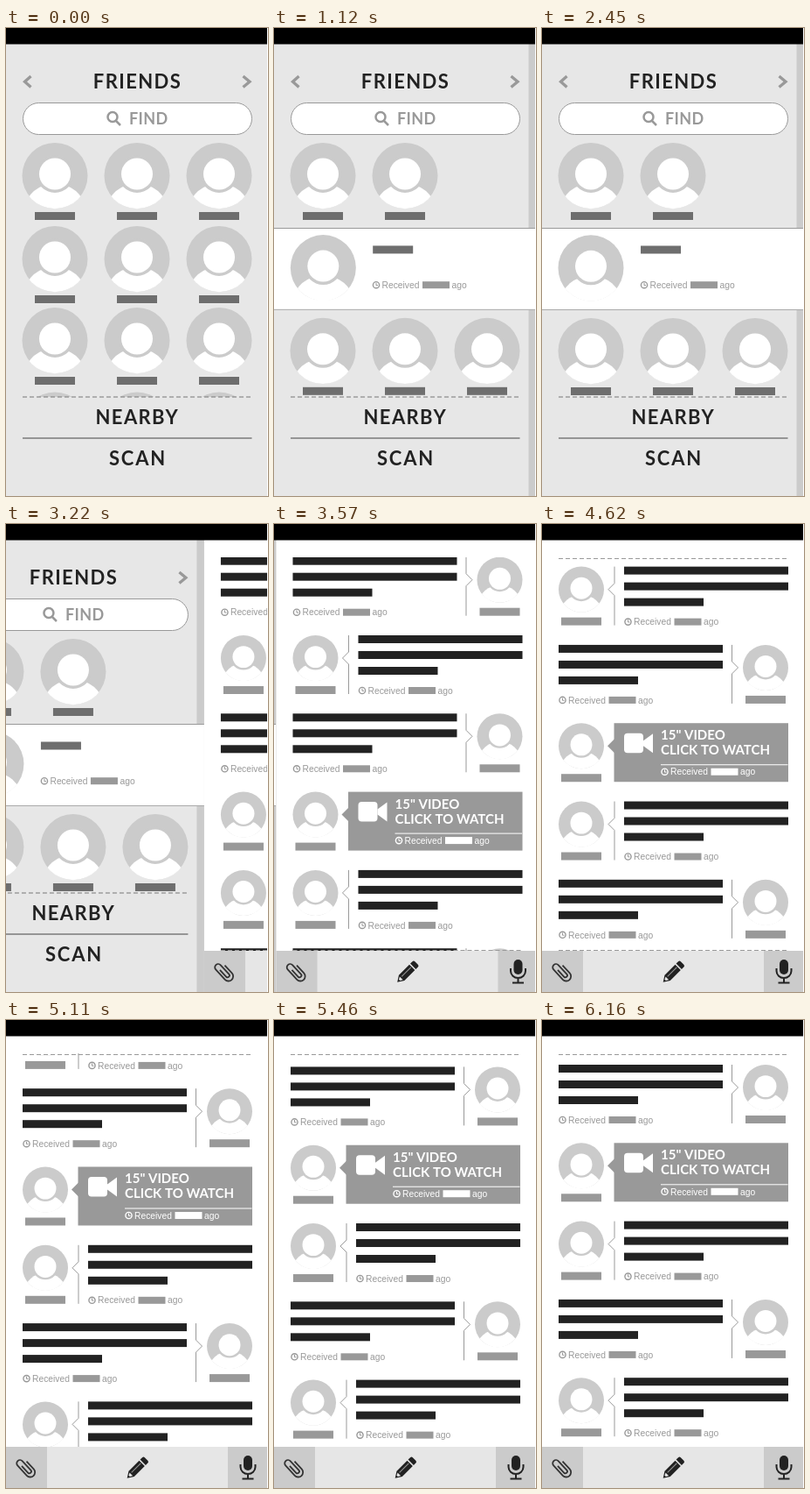
Write an HTML page with a canvas that moves like this. It is 300 px wide and 534 px high and loops after 6660 ms.

```html
<!DOCTYPE html>
<html lang="en">
<head>
<meta charset="utf-8">
<title>Friends and chat wireframe</title>
<style>
  html, body { margin: 0; width: 100%; height: 100%; overflow: hidden; background: #fff; }
  canvas { display: block; }
</style>
</head>
<body>
<canvas id="stage" width="300" height="534"></canvas>
<script>
const W = 300, H = 534, LOOP = 6660, STEP = 70;
const BG = '#e7e7e7', LIGHT = '#cbcbcb', MID = '#999', DARK = '#6e6e6e', INK = '#222';
const c = document.getElementById('stage').getContext('2d');

// Smooth 0..1 progress between two times
function ease(t, from, to) {
  const u = Math.min(1, Math.max(0, (t - from) / (to - from)));
  return u * u * (3 - 2 * u);
}
const mix = (a, b, u) => a + (b - a) * u;

function box(x, y, w, h, color) {
  c.fillStyle = color;
  c.fillRect(x, y, w, h);
}

function disc(x, y, r, color) {
  c.fillStyle = color;
  c.beginPath();
  c.arc(x, y, r, 0, 7);
  c.fill();
}

function stroke(path, color, width = 1) {
  c.strokeStyle = color;
  c.lineWidth = width;
  c.stroke(new Path2D(path));
}

function shape(path, color) {
  c.fillStyle = color;
  c.fill(new Path2D(path));
}

function label(str, x, y, size, color, align = 'left', spacing = 0) {
  c.font = `700 ${size}px Lato, sans-serif`;
  c.letterSpacing = spacing + 'px';
  c.textAlign = align;
  c.fillStyle = color;
  c.fillText(str, x, y);
  c.letterSpacing = '0px';
}

function dashes(y, color) {
  c.setLineDash([5, 3]);
  stroke(`M19 ${y}H281.5`, color);
  c.setLineDash([]);
}

function clipped(y0, y1, draw) {
  c.save();
  c.beginPath();
  c.rect(0, y0, W, y1 - y0);
  c.clip();
  draw();
  c.restore();
}

function avatar(x, y, r) {
  c.save();
  c.translate(x, y);
  c.scale(r / 37.5, r / 37.5);
  disc(0, 0, 37.5, LIGHT);
  c.beginPath();
  c.arc(0, 0, 37.7, 0, 7);
  c.clip();
  c.fillStyle = '#fff';
  c.beginPath();
  c.ellipse(0, 38, 34, 29, 0, 0, 7);
  c.fill();
  disc(0, -2, 21.5, LIGHT);
  disc(0, -2, 18, '#fff');
  c.restore();
}

// Clock, "Received", a bar for the time, "ago"
function received(x, y, color = MID, barColor = color) {
  c.strokeStyle = color;
  c.lineWidth = 1.4;
  c.beginPath();
  c.arc(x + 4.5, y, 3.6, 0, 7);
  c.stroke();
  stroke(`M${x + 4.5} ${y - 2.4}V${y + .4}H${x + 6.5}`, color);
  c.font = '10.3px "Liberation Sans", Arial, sans-serif';
  c.textAlign = 'left';
  c.fillStyle = color;
  c.fillText('Received', x + 11, y + 3.7);
  c.fillText('ago', x + 91, y + 3.7);
  box(x + 57.5, y - 4, 31, 8, barColor);
}

function friend(x, y) {
  avatar(x, y, 37.5);
  box(x - 23, y + 41.5, 46, 9, DARK);
}

function friendsPage(open) {
  box(0, 18, W, H - 18, BG);
  box(299.5 - 8 * open, 18, 9, H - 18, LIGHT);
  stroke('M28.5 55L21.5 61.2L28.5 67.5M271.5 55L279 61.2L271.5 67.5', MID, 3.3);
  label('FRIENDS', 150.5, 69, 22, INK, 'center', 1.4);

  c.beginPath();
  c.roundRect(19.5, 85.5, 262, 36, 18);
  c.fillStyle = '#fff';
  c.fill();
  c.strokeStyle = MID;
  c.lineWidth = 1;
  c.stroke();
  stroke('M127.5 101.5a5.5 5.5 0 1 1 -11 0a5.5 5.5 0 1 1 11 0M126 106L131 111', MID, 2.5);
  label('FIND', 141, 110, 18, MID, 'left', .4);

  clipped(122, 421, () => {
    const shift = 105 * open;
    [168.5, 263.5, 356.5, 453].forEach((y, row) => {
      [56, 150, 244].forEach((x, col) => {
        if (row || col < 2 || !open) friend(x, row ? y + shift : y);
      });
    });
    if (open > 0) {
      const h = 93.5 * open;
      box(0, 228, W, h, '#fff');
      box(0, 228, W, 1, '#999');
      box(0, 227.5 + h, W, 1, '#aaa');
      c.globalAlpha = open;
      received(112.5, 293.2);
      c.globalAlpha = 1;
      avatar(mix(244, 56, open), mix(168.5, 273.8, open), 37.5);
      box(mix(221, 113, open), mix(210, 248.5, open), 46, 9, DARK);
    }
  });

  dashes(421, '#777');
  label('NEARBY', 150.3, 452, 22, INK, 'center', 1.4);
  stroke('M19 468H281.5', '#444');
  label('SCAN', 151, 499, 22, INK, 'center', 1.8);
}

function person(x, y) {
  avatar(x, y + 26, 26);
  box(x - 23, y + 58, 46, 9, MID);
}

function message(y, right) {
  const x = right ? 19 : 94, line = right ? 217.5 : 83, tip = right ? 7 : -7;
  person(right ? 256 : 45, y);
  stroke(`M${line} ${y}V${y + 19}l${tip} 7l${-tip} 7V${y + 67}`, MID);
  box(x, y, 188, 9, INK);
  box(x, y + 18, 188, 9, INK);
  box(x, y + 36, 91, 9, INK);
  received(x, y + 63);
}

function video(y) {
  person(45, y);
  box(82.5, y, 199.5, 67, MID);
  shape(`M83 ${y + 18}L75 ${y + 26}L83 ${y + 34}Z`, MID);
  c.fillStyle = '#fff';
  c.beginPath();
  c.roundRect(94, y + 11.5, 22, 22.5, 4);
  c.fill();
  shape(`M116 ${y + 20}L127 ${y + 12}V${y + 34}L116 ${y + 26}Z`, '#fff');
  label('15" VIDEO', 136, y + 19, 15, '#fff');
  label('CLICK TO WATCH', 136, y + 36, 15, '#fff');
  box(136, y + 47, 145.5, 1, '#fff');
  received(136, y + 55.5, '#fff');
}

function toolbar() {
  box(0, 487, W, 47, '#e6e6e6');
  box(0, 487, 47, 47, LIGHT);
  box(254, 487, 46, 47, LIGHT);

  c.save();
  c.translate(23, 511);
  c.rotate(-.75);
  stroke('M-2.2 -5V5.5A2.2 2.2 0 0 0 2.2 5.5V-8.5A3.8 3.8 0 0 0 -5.4 -8.5V7A5.4 5.4 0 0 0 5.4 7V-5', '#333', 1.8);
  c.restore();

  c.save();
  c.translate(150, 511.5);
  c.rotate(-Math.PI / 4);
  shape('M-16 0L-9 -4.5H8V4.5H-9ZM9.5 -4.5H13Q15 -4.5 15 -2.5V2.5Q15 4.5 13 4.5H9.5Z', INK);
  stroke('M-8 -1H7', '#999', 1);
  shape('M-12.5 -1L-9.5 -2.5V2.5L-12.5 1Z', '#e6e6e6');
  c.restore();

  c.fillStyle = INK;
  c.beginPath();
  c.roundRect(272, 497, 10, 17, 5);
  c.fill();
  stroke('M268.5 507V510A8.5 8 0 0 0 285.5 510V507M277 518V523M270.5 523.5H283.5', INK, 2);
}

function chatPage(scroll) {
  box(0, 18, W, H - 18, '#fff');
  clipped(38, 487, () => {
    for (let i = 0; i < 7; i++) {
      const y = 37.7 + 89.3 * i - 165.3 * scroll;
      if (i === 3) video(y);
      else message(y, i === 0 || i === 2 || i === 5);
    }
  });
  if (scroll > 0) dashes(39.5, MID);
  if (scroll < .5) dashes(486.5, MID);
  toolbar();
}

function shifted(x, draw) {
  c.save();
  c.translate(x, 0);
  draw();
  c.restore();
}

function frame(now) {
  const t = Math.floor(now % LOOP / STEP) * STEP;
  const slide = W * ease(t, 3040, 3600);
  if (slide < W) shifted(-slide, () => friendsPage(ease(t, 720, 1130)));
  if (slide > 0) shifted(W - slide, () => chatPage(ease(t, 3710, 5595)));
  box(0, 0, W, 18.5, '#000');
  box(W - 1, 0, 1, H, '#fff');
  requestAnimationFrame(frame);
}
requestAnimationFrame(frame);
</script>
</body>
</html>
```
